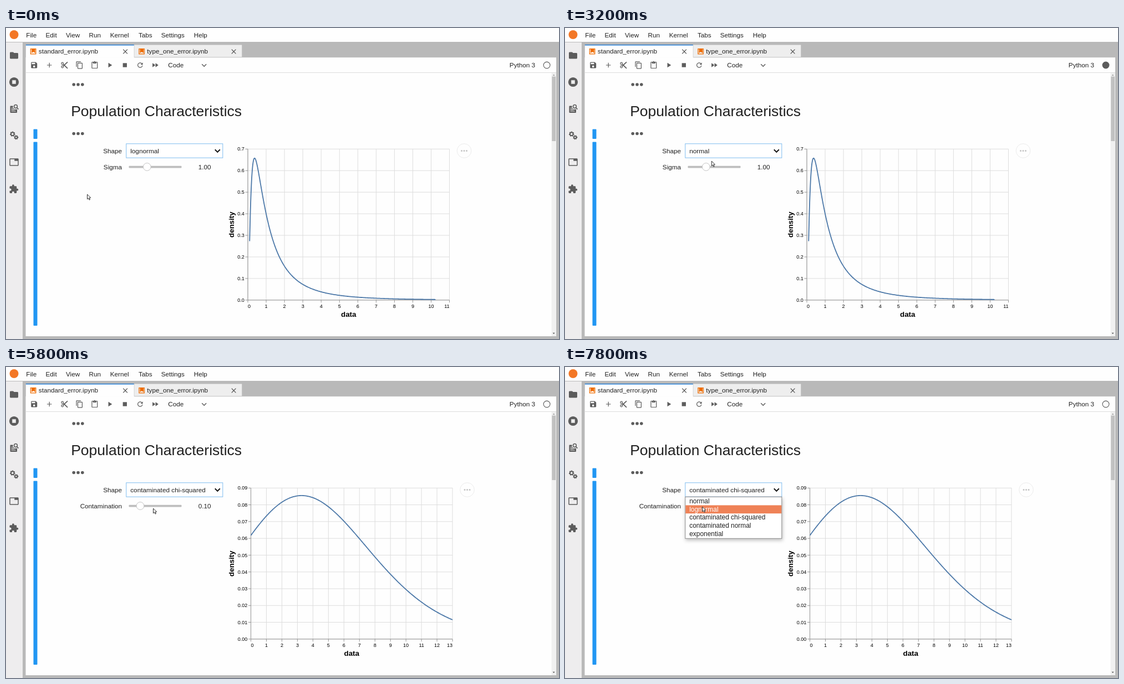
Animation of 997x561 px, one loop 8000 ms. Source, as an HTML page:

```html
<!DOCTYPE html>
<html lang="en">
<head>
<meta charset="utf-8">
<title>Population Characteristics</title>
<style>
  html, body { margin: 0; width: 100%; height: 100%; overflow: hidden; background: #fefefe; }
  svg { display: block; font-family: "Liberation Sans", Arial, sans-serif; }
</style>
</head>
<body>
<svg id="stage" width="997" height="561" viewBox="0 0 997 561">
  <g id="shell"></g>
  <g id="live"></g>
</svg>
<script>
const LOOP = 8000, STEP = 200;
const INK = '#212121', ICON = '#5c5c5c', PAPER = '#fefefe';
const $ = id => document.getElementById(id);

const rect = (x, y, w, h, fill, more = '') =>
  `<rect x="${x}" y="${y}" width="${w}" height="${h}" fill="${fill}" ${more}/>`;
const circle = (x, y, r, fill, more = '') =>
  `<circle cx="${x}" cy="${y}" r="${r}" fill="${fill}" ${more}/>`;
const stroke = (d, color, width, more = '') =>
  `<path d="${d}" fill="none" stroke="${color}" stroke-width="${width}" ${more}/>`;
const text = (x, y, str, size = 11.7, more = '', fill = INK) =>
  `<text x="${x}" y="${y}" font-size="${size}" fill="${fill}" ${more}>${str}</text>`;
const END = 'text-anchor="end"', MID = 'text-anchor="middle"', BOLD = 'font-weight="bold"';
const icon = (d, x, y, scale, box = 24) =>
  `<path d="${d}" fill="${ICON}" transform="translate(${x} ${y}) scale(${scale}) translate(${-box / 2} ${-box / 2})"/>`;
const dots = (x, y, gap, r, fill) =>
  [-1, 0, 1].map(i => circle(x + i * gap, y, r, fill)).join('');

const ICONS = {
  folder: 'M10 4H4c-1.1 0-2 .9-2 2v12c0 1.1.9 2 2 2h16c1.1 0 2-.9 2-2V8c0-1.1-.9-2-2-2h-8l-2-2z',
  tabs: 'M21 3H3c-1.1 0-2 .9-2 2v14c0 1.1.9 2 2 2h18c1.1 0 2-.9 2-2V5c0-1.1-.9-2-2-2zm0 16H3V5h10v4h8v10z',
  puzzle: 'M20.5 11H19V7c0-1.1-.9-2-2-2h-4V3.5a2.5 2.5 0 0 0-5 0V5H4c-1.1 0-2 .9-2 2v3.8h1.5a2.7 2.7 0 0 1 0 5.4H2V20c0 1.1.9 2 2 2h3.8v-1.5a2.7 2.7 0 0 1 5.4 0V22H17c1.1 0 2-.9 2-2v-4h1.5a2.5 2.5 0 0 0 0-5z',
  save: 'M17 3H5a2 2 0 0 0-2 2v14c0 1.1.9 2 2 2h14c1.1 0 2-.9 2-2V7l-4-4zm-5 16a3 3 0 1 1 0-6 3 3 0 0 1 0 6zm3-10H5V5h10v4z',
  add: 'M19 13h-6v6h-2v-6H5v-2h6V5h2v6h6v2z',
  copy: 'M16 1H4c-1.1 0-2 .9-2 2v14h2V3h12V1zm3 4H8c-1.1 0-2 .9-2 2v14c0 1.1.9 2 2 2h11c1.1 0 2-.9 2-2V7c0-1.1-.9-2-2-2zm0 16H8V7h11v14z',
  paste: 'M19 2h-4.2a3 3 0 0 0-5.6 0H5c-1.1 0-2 .9-2 2v16c0 1.1.9 2 2 2h14c1.1 0 2-.9 2-2V4c0-1.1-.9-2-2-2zm-7 0a1 1 0 1 1 0 2 1 1 0 0 1 0-2zm7 18H5V4h2v3h10V4h2v16z',
  run: 'M8 5v14l11-7z',
  stop: 'M6 6h12v12H6z',
  skip: 'M4 18l8.5-6L4 6v12zm9-12v12l8.5-6L13 6z',
  reload: 'M9 13.5a4.5 4.5 0 1 1 3.2-7.7L10 8h5V3l-1.8 1.8A6 6 0 1 0 14.9 10h-1.5A4.5 4.5 0 0 1 9 13.5z'
};

function sidebar() {
  const gear = (x, y, r) =>
    circle(x, y, r, 'none', `stroke="${ICON}" stroke-width="2"`) +
    circle(x, y, r + 1.2, 'none', `stroke="${ICON}" stroke-width="1.3" stroke-dasharray="${r * .58} ${r * .68}"`);
  return icon(ICONS.folder, 14.5, 49.5, .75) +
    circle(14.5, 97.5, 8.6, ICON) + rect(11.2, 94.2, 6.6, 6.6, '#eee') +
    rect(7.5, 140.5, 12.5, 12.5, ICON, 'rx="1"') +
    stroke('M9.5 144.5h4M9.5 147.3h6M9.5 150h8', '#eee', 1.2) +
    circle(17.5, 142, 5, '#eee') +
    circle(17.5, 141.5, 2.9, 'none', `stroke="${ICON}" stroke-width="1.5"`) +
    stroke('M19.5 143.6l3 3', ICON, 1.6) +
    gear(11.8, 191.2, 2.9) + gear(18.3, 197.3, 2.2) +
    icon(ICONS.tabs, 14.5, 242, .75) + icon(ICONS.puzzle, 14, 290.5, .75);
}

function tab(x, label, active) {
  const w = active ? 195 : 194;
  return rect(x, 30.5, w, 23, active ? PAPER : '#eee') +
    (active ? rect(x, 30, w, 1.4, '#1976d2') : '') +
    stroke(`M${x + 8.6} 37.7h9.4v9.2h-9.4z`, '#ef6c00', 1.3) +
    `<path d="M${x + 10.3} 38h6.4v7.3l-3.2-2.4-3.2 2.4z" fill="#ef6c00"/>` +
    text(x + 23, 46.3, label) +
    stroke(`M${x + 175.5} 38.7l7.6 7.6m0 -7.6l-7.6 7.6`, '#4a4a4a', 1.2);
}

function toolbar() {
  const at = { save: 50.7, add: 78.2, copy: 132.5, paste: 159.8, run: 187, stop: 214.3, skip: 269 };
  const cut = [64, 70].map(y => circle(101.7, y, 1.8, 'none', `stroke="${ICON}" stroke-width="1.2"`)).join('') +
    stroke('M103 65.2L111 72.8M103 68.8L111 61.4', ICON, 1.7);
  return Object.keys(at).map(k => icon(ICONS[k], at[k], 67, .61)).join('') + cut +
    icon(ICONS.reload, 241.8, 67, .8, 18) +
    text(292.3, 71, 'Code') + stroke('M353.2 65.2l4 4 4-4', ICON, 1.4) +
    text(954, 71, 'Python 3', 11.7, END);
}

function shell() {
  const menus = { File: 36.3, Edit: 71.5, View: 108, Run: 149.5, Kernel: 187.7, Tabs: 239, Settings: 279.7, Help: 338.7 };
  return rect(0, 0, 997, 561, PAPER) +
    rect(0, 25, 997, 536, '#b9b9b9') + rect(0, 26, 30, 535, '#eeedee') +
    circle(14.5, 12, 8, '#f37726') +
    Object.entries(menus).map(([name, x]) => text(x, 17.1, name)).join('') +
    sidebar() +
    rect(35.5, 53, 956.5, 503, PAPER) +
    tab(35.8, 'standard_error.ipynb', true) + tab(231.3, 'type_one_error.ipynb', false) +
    rect(231, 52.4, 761, .8, '#bdbdbd') +
    toolbar() +
    rect(35.5, 80, 956.5, 1, '#dcdcdc') +
    rect(983.5, 81, 8.5, 475, '#f1f1f1') + rect(984.2, 87.5, 6.8, 116.5, '#c1c1c1') +
    '<path d="M985.6 86l2-2.4 2 2.4z" fill="#a3a3a3"/><path d="M985.6 549.7l2 2.4 2-2.4z" fill="#505050"/>' +
    rect(49.5, 182.5, 7, 17.5, '#2196f3', 'rx="1"') + rect(49.5, 205.5, 7, 331.5, '#2196f3', 'rx="1"') +
    dots(130, 102, 7.8, 2.8, ICON) + dots(130, 190.5, 7.8, 2.8, ICON) +
    text(117.2, 158.5, 'Population Characteristics', 26.5) +
    text(209, 225.7, 'Shape', 11.7, END);
}

const gauss = z => Math.exp(-z * z / 2) / Math.sqrt(2 * Math.PI);
const Z99 = 2.3263;
const CHARTS = {
  lognormal: { left: 436, x: [0, 11, 1, 0], y: [.7, .1, 1], from: Math.exp(-Z99), to: Math.exp(Z99),
    pdf: v => gauss(Math.log(v)) / v },
  normal: { left: 441.5, x: [-2.5, 2.5, .5, 1], y: [.4, .05, 2], from: -Z99, to: Z99, pdf: gauss },
  'contaminated chi-squared': { left: 441.5, x: [0, 13, 1, 0], y: [.09, .01, 2], from: 0, to: 13,
    pdf: v => {
      const d = v - 3.27, width = 4.2 + .05 * d + .0018 * d * d;
      return .0855 * Math.exp(-d * d / (2 * width * width));
    } }
};

function chart(name) {
  const c = CHARTS[name], W = 363.5, TOP = 218.3, BASE = 490.8, right = c.left + W;
  const [lo, hi, dx, xDigits] = c.x, [max, dy, yDigits] = c.y;
  const px = v => c.left + (v - lo) / (hi - lo) * W;
  const py = v => BASE - v / max * (BASE - TOP);
  let grid = '', ticks = '', labels = '';
  const nx = Math.round((hi - lo) / dx), ny = Math.round(max / dy);
  for (let i = 0; i <= nx; i++) {
    const v = lo + i * dx, x = px(v);
    grid += `M${x} ${TOP}V${BASE}`;
    ticks += `M${x} ${BASE}v4.5`;
    const anchor = i === 0 ? '' : i === nx ? END : MID;
    labels += text(x, 505.2, v.toFixed(xDigits).replace('-', '\u2212'), 9, anchor, '#000');
  }
  for (let i = 0; i <= ny; i++) {
    const y = py(i * dy);
    grid += `M${c.left} ${y}H${right}`;
    ticks += `M${c.left} ${y}h-4.5`;
    labels += text(c.left - 6.3, y + 3.1, (i * dy).toFixed(yDigits), 9, END, '#000');
  }
  const N = 300, pts = [];
  for (let i = 0; i <= N; i++) {
    const v = c.from + (c.to - c.from) * (i / N) ** 1.6;
    pts.push(px(v).toFixed(2) + ' ' + py(c.pdf(v)).toFixed(2));
  }
  const mid = c.left + W / 2;
  return stroke(grid, '#ddd', 1) +
    stroke(`${ticks}M${c.left} ${TOP}V${BASE}H${right}`, '#8a8a8a', .9) +
    stroke('M' + pts.join('L'), '#4c78a8', 1.8, 'stroke-linejoin="round"') + labels +
    text(mid, 521, 'data', 13.3, `${MID} ${BOLD}`, '#000') +
    text(0, 0, 'density', 13.3, `${MID} ${BOLD} transform="translate(410.6 354.6) rotate(-90)"`, '#000') +
    circle(c.left + 390, 221.5, 12.8, PAPER, 'stroke="#ececec" stroke-width="1"') +
    dots(c.left + 390, 221.5, 4.5, 1.5, '#c4c4c4');
}

const OPTIONS = ['normal', 'lognormal', 'contaminated chi-squared', 'contaminated normal', 'exponential'];
const ROW = 14.8, LIST_TOP = 234.6;

function controls(shape, plotted) {
  const mixed = plotted.startsWith('contaminated');
  return text(209, 254.8, mixed ? 'Contamination' : 'Sigma', 11.7, END) +
    rect(221.5, 248.8, 95, 3.6, '#bdbdbd', 'rx="1"') +
    circle(mixed ? 242 : 254.3, 250.5, 6.9, '#fff', 'stroke="#c4c4c4" stroke-width="1"') +
    text(346.7, 254.8, mixed ? '0.10' : '1.00') +
    rect(216.8, 208.8, 174, 25.4, '#fff', 'stroke="#7fbdf0" stroke-width="1"') +
    text(224.2, 225.7, shape, 11.8) +
    stroke('M376.8 219.3l4.5 4.6 4.5-4.6', '#111', 2);
}

function list(shape, x, y) {
  const over = Math.floor((y - LIST_TOP) / ROW);
  const active = over >= 0 && over < OPTIONS.length ? over : OPTIONS.indexOf(shape);
  return rect(216.8, 234.3, 174, 75, '#fff',
      'stroke="#8b8b8b" stroke-width="1" style="filter:drop-shadow(1px 3px 3px rgba(0,0,0,.25))"') +
    rect(217.3, LIST_TOP + active * ROW, 173, ROW, '#ef8257') +
    OPTIONS.map((o, i) => text(224.2, 245.8 + i * ROW, o, 11.93, '', i === active ? '#fff' : INK)).join('');
}

// Pointer stops: time, x, y
const PATH = [
  [0, 146, 300], [1200, 126, 362], [1400, 180, 290], [1600, 240, 204], [1800, 262, 220],
  [2400, 266, 224], [2600, 263, 240], [3400, 264, 240], [4000, 301, 221], [4200, 301, 221],
  [4400, 284, 262], [4600, 262, 298], [5000, 262, 298], [5200, 263, 265], [5400, 263, 265],
  [6200, 267, 245], [6400, 300, 222], [6600, 300, 222], [7200, 255, 222], [7400, 249, 224],
  [7800, 247, 252], [8000, 247, 252]
];
const OPEN = [[2200, 3200], [4200, 5400], [7200, 8000]];
const pick = (t, first, second) => t < first ? 'lognormal' : t < second ? 'normal' : 'contaminated chi-squared';

function pointer(t) {
  const i = PATH.findIndex(p => p[0] > t), [t0, x0, y0] = PATH[i - 1], [t1, x1, y1] = PATH[i];
  const k = (t - t0) / (t1 - t0);
  return [x0 + (x1 - x0) * k, y0 + (y1 - y0) * k];
}

function render(t) {
  const shape = pick(t, 3200, 5400), plotted = pick(t, 3400, 5600);
  const [x, y] = pointer(t);
  const open = OPEN.some(([a, b]) => t >= a && t < b);
  $('live').innerHTML =
    circle(975, 67, 5.9, shape === plotted ? 'none' : ICON, `stroke="${ICON}" stroke-width="1.1"`) +
    chart(plotted) + controls(shape, plotted) + (open ? list(shape, x, y) : '') +
    `<path d="M0 0V8.8L2.1 7 3.6 10.2 5 9.5 3.6 6.5 6.2 6.2z" transform="translate(${x + .5} ${y})"
      fill="#f4f4f4" stroke="#333" stroke-width="1" stroke-linejoin="round"/>`;
}

$('shell').innerHTML = shell();
let shown = -1;
const start = performance.now();
function tick() {
  const t = Math.floor((performance.now() - start) % LOOP / STEP) * STEP;
  if (t !== shown) render(shown = t);
  requestAnimationFrame(tick);
}
tick();
</script>
</body>
</html>
```
